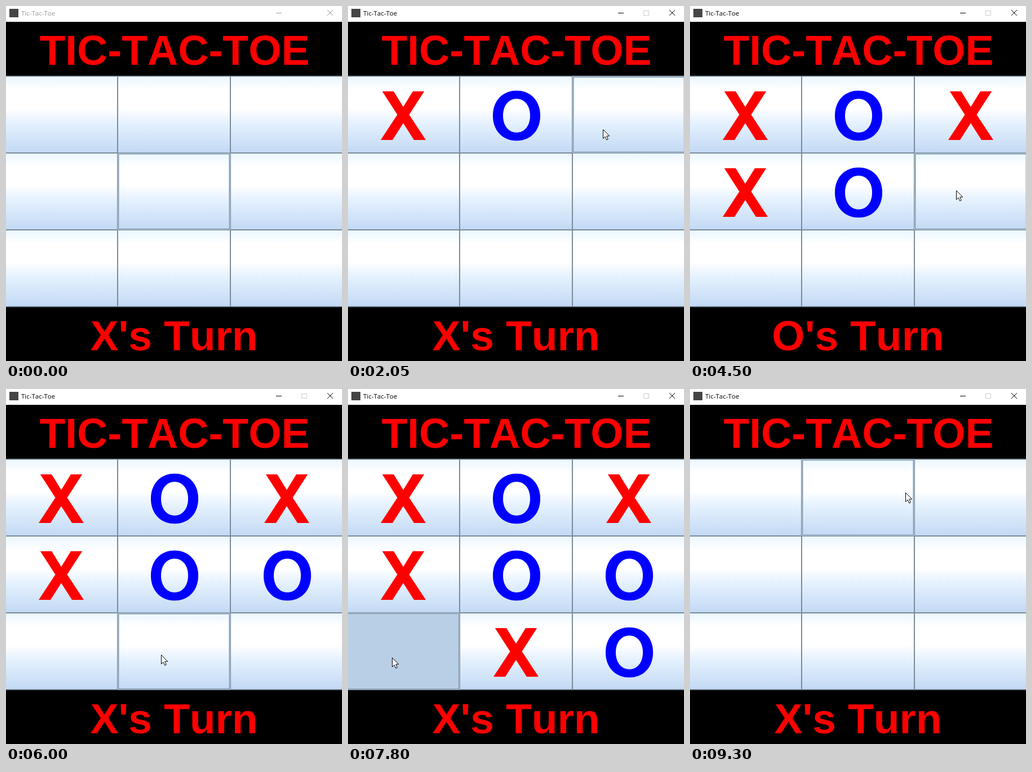
Animation of 596x628 px, one loop 9.35 s. Source, as an HTML page with a canvas:

```html
<!DOCTYPE html>
<html lang="en">
<head>
<meta charset="utf-8">
<title>Tic-Tac-Toe</title>
<style>
  html, body { margin: 0; width: 100%; height: 100%; overflow: hidden; background: #000; }
  canvas { display: block; }
</style>
</head>
<body>
<canvas id="stage" width="596" height="628"></canvas>
<script>
const ctx = document.getElementById('stage').getContext('2d');
const LOOP = 9350, STEP = 50, PRESS = 100;
const ARIAL = '"Liberation Sans", Arial, sans-serif';
const BIG = 'bold 75px ' + ARIAL, SMALL = 'bold 11.5px ' + ARIAL;
const EDGE = '#7a8a99', GLOW = '#b8cfe5', RED = '#f00';

// Mouse presses: time, x, y. X and O take turns.
const presses = [
  [500, 95, 222], [1250, 272, 222], [2200, 452, 218], [3200, 246, 351],
  [3850, 85, 346], [4750, 480, 326], [6250, 275, 470], [6800, 452, 463], [7750, 78, 475]
];
const yes = [8850, 276, 350];
const stops = [[STEP, 270, 345], ...presses, yes, [9450, 382, 183]];
const moves = presses.map(([at, x, y]) => ({ at, cell: cellAt(x, y) }));
const dialogOpen = presses[8][0] + 150, dialogClose = yes[0] + PRESS;

function cellAt(x, y) {
  return Math.floor((y - 124) / 136) * 3 + Math.floor((x + 2) / 200);
}

// Between two presses the pointer rests, glides over, and rests again.
function pointerAt(t) {
  const next = stops.findIndex(s => s[0] > t);
  if (next === 0) return null;
  const [t0, x0, y0] = stops[next - 1], [t1, x1, y1] = stops[next];
  const u = Math.min(1, Math.max(0, ((t - t0) / (t1 - t0) - 0.42) / 0.33));
  const k = u * u * (3 - 2 * u);
  return [Math.round(x0 + (x1 - x0) * k), Math.round(y0 + (y1 - y0) * k)];
}

function fill(color, x, y, w, h) {
  ctx.fillStyle = color;
  ctx.fillRect(x, y, w, h);
}

function frame(color, x, y, w, h, inset = 0) {
  ctx.strokeStyle = color;
  ctx.lineWidth = 1;
  ctx.strokeRect(x + inset + 0.5, y + inset + 0.5, w - 1 - 2 * inset, h - 1 - 2 * inset);
}

function text(string, x, y, font, color, align = 'center') {
  ctx.font = font;
  ctx.fillStyle = color;
  ctx.textAlign = align;
  ctx.fillText(string, x, y);
}

function polygon(points, x, y) {
  ctx.beginPath();
  points.forEach(([px, py]) => ctx.lineTo(x + px, y + py));
  ctx.closePath();
}

function closeIcon(x, y, color) {
  ctx.strokeStyle = color;
  ctx.lineWidth = 1;
  ctx.beginPath();
  for (const d of [-5, 5]) {
    ctx.moveTo(x - d, y - 5);
    ctx.lineTo(x + d, y + 5);
  }
  ctx.stroke();
}

function gradient(x0, y0, x1, y1, ...stops) {
  const g = ctx.createLinearGradient(x0, y0, x1, y1);
  stops.forEach(([at, color]) => g.addColorStop(at, color));
  return g;
}

function gloss(y, h) {
  return gradient(0, y, 0, y + h,
    [0, '#eaf7ff'], [0.18, '#fff'], [0.42, '#fff'], [0.6, '#e6f2fe'], [1, '#c2d9f4']);
}

// Left half of the letter; the right half mirrors it.
const halfCross = [[-19, 43], [-40, 43], [-10.5, -1.8], [-37.2, -43], [-17, -43], [0, -15.4]];
const crossShape = [
  [0, 13.3], ...halfCross, ...halfCross.slice(0, 5).reverse().map(([x, y]) => [-x, y])
];

function cross(x, y) {
  polygon(crossShape, x, y);
  ctx.fillStyle = RED;
  ctx.fill();
}

function oval(x, y, rx, ry) {
  const bulge = v => Math.sign(v) * Math.abs(v) ** 0.94;
  for (let i = 0; i < 90; i++) {
    const a = i / 45 * Math.PI;
    ctx[i ? 'lineTo' : 'moveTo'](x + rx * bulge(Math.cos(a)), y + ry * bulge(Math.sin(a)));
  }
  ctx.closePath();
}

function nought(x, y) {
  ctx.beginPath();
  oval(x + 1, y, 42, 44.3);
  oval(x + 1, y, 24, 29.8);
  ctx.fillStyle = '#00f';
  ctx.fill('evenodd');
}

function drawTitleBar(active) {
  const ink = active ? '#000' : '#999';
  fill('#fff', 0, 0, 596, 28);
  fill('#454545', 6, 5, 16, 15);
  text('Tic-Tac-Toe', 27, 17, '11.5px "Open Sans", sans-serif', ink, 'left');
  fill(ink, 479, 12, 10, 1);
  if (active) frame('#ccc', 524, 8, 10, 9);
  closeIcon(575, 12, ink);
}

function drawCell(i, { mark, hover, pressed, won }) {
  const x = -2 + i % 3 * 200, y = 124 + Math.floor(i / 3) * 136;
  const box = [x, y, 200, 136];
  fill(won ? '#0f0' : pressed ? GLOW : gloss(y, 136), ...box);
  const borders = hover ? [GLOW, EDGE, GLOW] : [EDGE];
  borders.forEach((color, inset) => frame(color, ...box, inset));
  if (mark === 'X') cross(x + 100, y + 70);
  if (mark === 'O') nought(x + 100, y + 70);
}

function drawButton(label, x, isDefault, pressed) {
  const box = [x, 334, 43, 26], mid = x + 21.5;
  fill(pressed ? GLOW : gloss(334, 26), ...box);
  frame(EDGE, ...box);
  if (isDefault) {
    frame(EDGE, ...box, 1);
    frame('#a3b8cc', x + 10, 338, 23, 18);
  }
  text(label, mid, 352, SMALL, '#222');
  const left = mid - ctx.measureText(label).width / 2;
  fill('#222', Math.round(left), 353, Math.round(ctx.measureText(label[0]).width), 1);
}

function drawDialog(t) {
  ctx.save();
  ctx.shadowColor = 'rgba(0,0,0,.32)';
  ctx.shadowBlur = 16;
  ctx.shadowOffsetY = 3;
  fill('#fff', 167, 253, 262, 120);
  ctx.restore();
  frame('#555', 166, 252, 264, 122);
  closeIcon(414, 267, '#000');

  fill('#ccc', 181, 296, 26, 26);
  fill(gradient(178, 293, 205, 320, [0, '#7fb985'], [1, '#b9d3b9']), 178, 293, 27, 27);
  frame('#6d9a72', 178, 293, 27, 27);
  ctx.font = 'bold 21px ' + ARIAL;
  ctx.textAlign = 'center';
  ctx.strokeStyle = '#d5ead5';
  ctx.lineWidth = 3;
  ctx.strokeText('?', 191.5, 314);
  text('?', 191.5, 314, ctx.font, '#000');

  text('Would you like to play again?', 224, 314, SMALL, '#333', 'left');
  drawButton('Yes', 252, true, t >= yes[0]);
  drawButton('No', 301, false, false);
}

const arrow = [[0, 0], [0, 16], [3.6, 12.6], [6.2, 18.4], [8.8, 17.2], [6.3, 11.5], [11.3, 11.5]];

function drawPointer([x, y]) {
  polygon(arrow, x + 0.5, y + 0.5);
  ctx.fillStyle = '#fff';
  ctx.fill();
  ctx.strokeStyle = '#000';
  ctx.lineWidth = 1;
  ctx.stroke();
}

function draw(t) {
  const dialog = t >= dialogOpen && t < dialogClose;
  const played = t < dialogClose ? moves.filter(m => t >= m.at + PRESS) : [];
  const won = played.length === moves.length;
  const pointer = pointerAt(t);
  const hover = dialog ? 6 : pointer ? cellAt(...pointer) : 4;
  const down = moves.find(m => t >= m.at && t < m.at + PRESS);

  fill('#000', 0, 0, 596, 628);
  drawTitleBar(t >= STEP && !dialog);
  text('TIC-TAC-TOE', 299, 104, BIG, RED);
  frame('#4b5660', -2, 123, 600, 410);
  for (let i = 0; i < 9; i++) {
    const order = played.findIndex(m => m.cell === i);
    drawCell(i, {
      mark: order < 0 ? '' : 'XO'[order % 2],
      hover: i === hover,
      pressed: down !== undefined && down.cell === i,
      won: won && i % 3 === 0
    });
  }
  text(won ? 'X WINS!' : 'XO'[played.length % 2] + "'s Turn", 298, 609, BIG, RED);
  if (dialog) drawDialog(t);
  if (pointer) drawPointer(pointer);
}

ctx.fontKerning = 'none';
const start = performance.now();
function tick() {
  const t = (performance.now() - start) % LOOP;
  draw(Math.floor(t / STEP) * STEP);
  requestAnimationFrame(tick);
}
tick();
</script>
</body>
</html>
```
